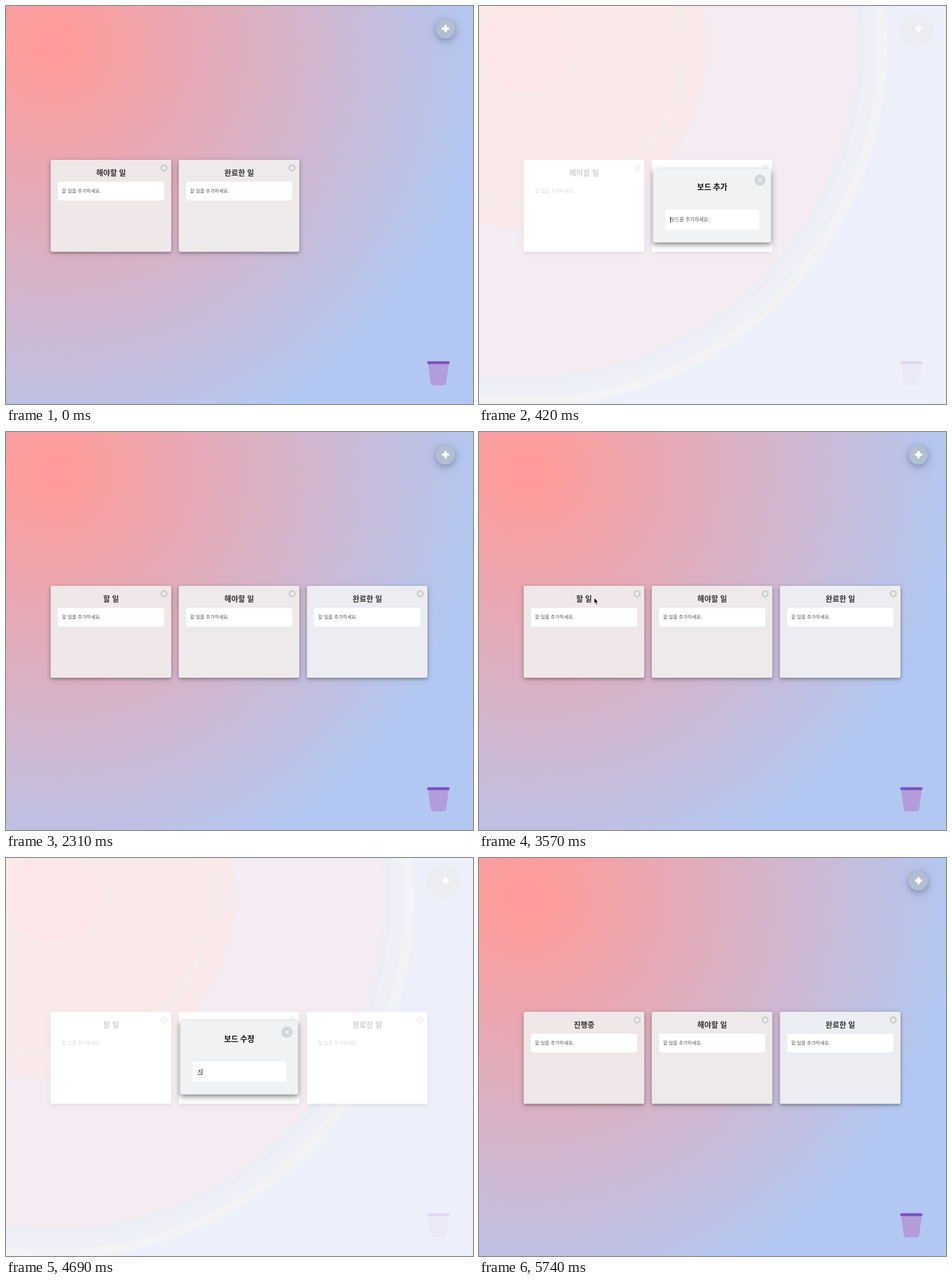
An HTML page for the animation above (6160 ms loop, 811 px wide and 691 px high).

```html
<!DOCTYPE html>
<html lang="ko">
<head>
<meta charset="utf-8">
<title>보드</title>
<style>
  html, body { margin: 0; width: 100%; height: 100%; overflow: hidden; background: #b2c8f2; }
  svg { display: block; width: 811px; height: 691px; }
  text { font-family: 'Noto Sans CJK KR', 'Noto Sans CJK JP', 'Noto Sans CJK', sans-serif; white-space: pre; }
  .card { filter: drop-shadow(0 2px 2px rgba(0,0,0,.23)) drop-shadow(0 2px 4px rgba(0,0,0,.22)); }
  .modal { filter: drop-shadow(0 3px 3px rgba(0,0,0,.28)) drop-shadow(0 4px 6px rgba(0,0,0,.26)); }
  .add { filter: drop-shadow(0 3px 4px rgba(70,80,120,.3)) drop-shadow(0 3px 9px rgba(70,80,120,.3)); }
  .typing { text-decoration: underline; text-decoration-thickness: 1px; }
</style>
</head>
<body>
<svg viewBox="0 0 811 691">
  <defs>
    <radialGradient id="day" gradientUnits="userSpaceOnUse" cx="81" cy="69" r="745">
      <stop offset=".03" stop-color="#ff9b99"/>
      <stop offset="1" stop-color="#b2c8f2"/>
    </radialGradient>
    <radialGradient id="veiled" gradientUnits="userSpaceOnUse" cx="81" cy="69" r="740"></radialGradient>
  </defs>
  <g id="scene"></g>
</svg>
<script>
const LOOP = 6160, STEP = 70, VEIL = 0.77;
const scene = document.getElementById('scene');

// Background rings behind the dialog: start radius and colour as seen through the veil
const RINGS = [
  [0, 253, 230, 232], [80, 250, 233, 233], [270, 247, 235, 236], [281, 250, 233, 234],
  [318, 244, 236, 242], [576, 236, 237, 245], [588, 239, 239, 247],
  [612, 243, 243, 245], [629, 237, 240, 250]
];
const unveil = rgb => `rgb(${rgb.map(c => Math.round(255 - (255 - c) / (1 - VEIL)))})`;

document.getElementById('veiled').innerHTML = RINGS.map(([r, ...rgb], i) => {
  const end = i + 1 < RINGS.length ? RINGS[i + 1][0] - 2 : 740;
  return [r, end].map(d => `<stop offset="${d / 740}" stop-color="${unveil(rgb)}"/>`).join('');
}).join('');

const DIALOGS = [
  { from: 420, to: 2310, title: '보드 추가', hint: '보드를 추가하세요.', caretOff: 1050, caretOn: 1470,
    keys: [[1470, '', 'ㅎ'], [1680, '', '하'], [1750, '', '할'], [1820, '할 ', ''],
           [1960, '할 ', '이'], [2100, '할 ', '일']] },
  { from: 3710, to: 5740, title: '보드 수정', hint: '보드를 수정하세요.', caretOff: 4130, caretOn: 4620,
    keys: [[4690, '', 'ㅈ'], [4900, '', '지'], [5040, '', '진'], [5110, '진', 'ㅎ'],
           [5180, '진', '해'], [5390, '진', '행'], [5460, '진행', 'ㅈ'], [5600, '진행', '중']] }
];

const POINTER = [[2870, 363, 342], [3360, 234, 282], [3430, 241, 286], [3500, 198, 284], [3570, 200, 288], [3780, 200, 288]];

const box = (x, y, w, h, fill, extra = '') =>
  `<rect x="${x}" y="${y}" width="${w}" height="${h}" rx="3" fill="${fill}" ${extra}/>`;

const label = (x, y, size, fill, content, extra = '') =>
  `<text x="${x}" y="${y + size * 0.38}" font-size="${size}" fill="${fill}" ${extra}>${content}</text>`;

const heading = (x, y, size, fill, content) =>
  label(x, y, size, fill, content, 'text-anchor="middle" font-weight="700"');

const closeButton = (x, y, r, arm, fill) =>
  `<circle cx="${x}" cy="${y}" r="${r}" fill="${fill}"/>
   <path d="M${x - arm} ${y - arm}l${2 * arm} ${2 * arm}m0 ${-2 * arm}l${-2 * arm} ${2 * arm}"
     stroke="#fff" stroke-width="1.4" stroke-linecap="round"/>`;

function card(title, i, veiled) {
  const x = 77.5 + i * 222.5;
  const fill = veiled ? '#fff' : ['#f0e7e8', '#eeeaec', '#ecedf2'][i];
  return box(x, 267, 209.5, 159.7, fill, 'class="card"') +
    heading(x + 105, 289.3, 13, '#333', title) +
    closeButton(x + 197, 281, 6.2, 2.4, '#cfcfcf') +
    box(x + 12.7, 305.3, 184.3, 32.5, '#fff') +
    label(x + 19.5, 321.3, 8.3, '#555', '할 일을 추가하세요.');
}

function addButton(veiled) {
  const disc = veiled
    ? `<circle cx="759.5" cy="42" r="29.5" fill="${unveil([235, 237, 242])}"/>`
    : '<circle cx="763" cy="40" r="16.6" fill="#b2bfd3" class="add"/>';
  return disc + '<path d="M759 39.2h8.6M763.3 35v8.6" stroke="#fff" stroke-width="4.4" stroke-linecap="round"/>';
}

const TRASH = `
  <path d="M733 621h36l-4.6 33.5q-.6 4-4.4 4h-18q-3.800 0-4.400-4z" fill="#b39cda"/>
  <rect x="731.500" y="616.700" width="38.700" height="5" rx="2" fill="#7b53c1"/>`;

function dialog(d, t) {
  const key = d.keys.filter(k => k[0] <= t).pop();
  const entry = key
    ? label(332.3, 371, 8.8, '#111', `${key[1]}<tspan class="typing">${key[2]}</tspan>`, 'id="entry"')
    : label(332.3, 371, 8.6, '#555', d.hint);
  const caret = t < d.caretOff || t >= d.caretOn
    ? '<rect id="caret" x="332" y="366" width="1" height="10" fill="#222"/>' : '';
  return box(302.5, 282.5, 204.5, 128, '#f1f2f4', 'class="modal"') +
    heading(405, 313.5, 13.3, '#111', d.title) +
    closeButton(488, 302.3, 9.7, 2.7, '#d1d6dd') +
    box(324, 353.8, 162.5, 34.7, '#fff') + entry + caret;
}

function pointer(t) {
  const i = POINTER.findIndex((p, n) => n + 1 < POINTER.length && t >= p[0] && t < POINTER[n + 1][0]);
  if (i < 0) return '';
  const [t0, x0, y0] = POINTER[i], [t1, x1, y1] = POINTER[i + 1];
  const p = (t - t0) / (t1 - t0), e = p * p * (3 - 2 * p);
  return `<path transform="translate(${x0 + (x1 - x0) * e} ${y0 + (y1 - y0) * e})"
    d="M0 0v10l2.300-2.100 1.700 3.900 1.800-.8-1.700-3.700h3.100z" fill="#000" stroke="#fff" stroke-width=".8"/>`;
}

function draw(t) {
  const open = DIALOGS.find(d => t >= d.from && t < d.to);
  const boards = ['해야할 일', '완료한 일'];
  if (t >= 2310) boards.unshift(t < 5740 ? '할 일' : '진행중');

  scene.innerHTML =
    `<rect width="811" height="691" fill="url(#${open ? 'veiled' : 'day'})"/>` +
    boards.map((title, i) => card(title, i, open)).join('') +
    addButton(open) + TRASH +
    (open ? `<rect width="811" height="691" fill="#fff" opacity="${VEIL}"/>` + dialog(open, t) : '') +
    pointer(t);

  const entry = document.getElementById('entry'), caret = document.getElementById('caret');
  if (entry && caret) caret.setAttribute('x', Math.round(332 + entry.getComputedTextLength()));
}

const start = performance.now();
let shown = -1;
function tick() {
  const elapsed = (performance.now() - start) % LOOP;
  const t = Math.floor(elapsed / STEP) * STEP;
  if (t !== shown) draw(shown = t);
  requestAnimationFrame(tick);
}
tick();
</script>
</body>
</html>
```
